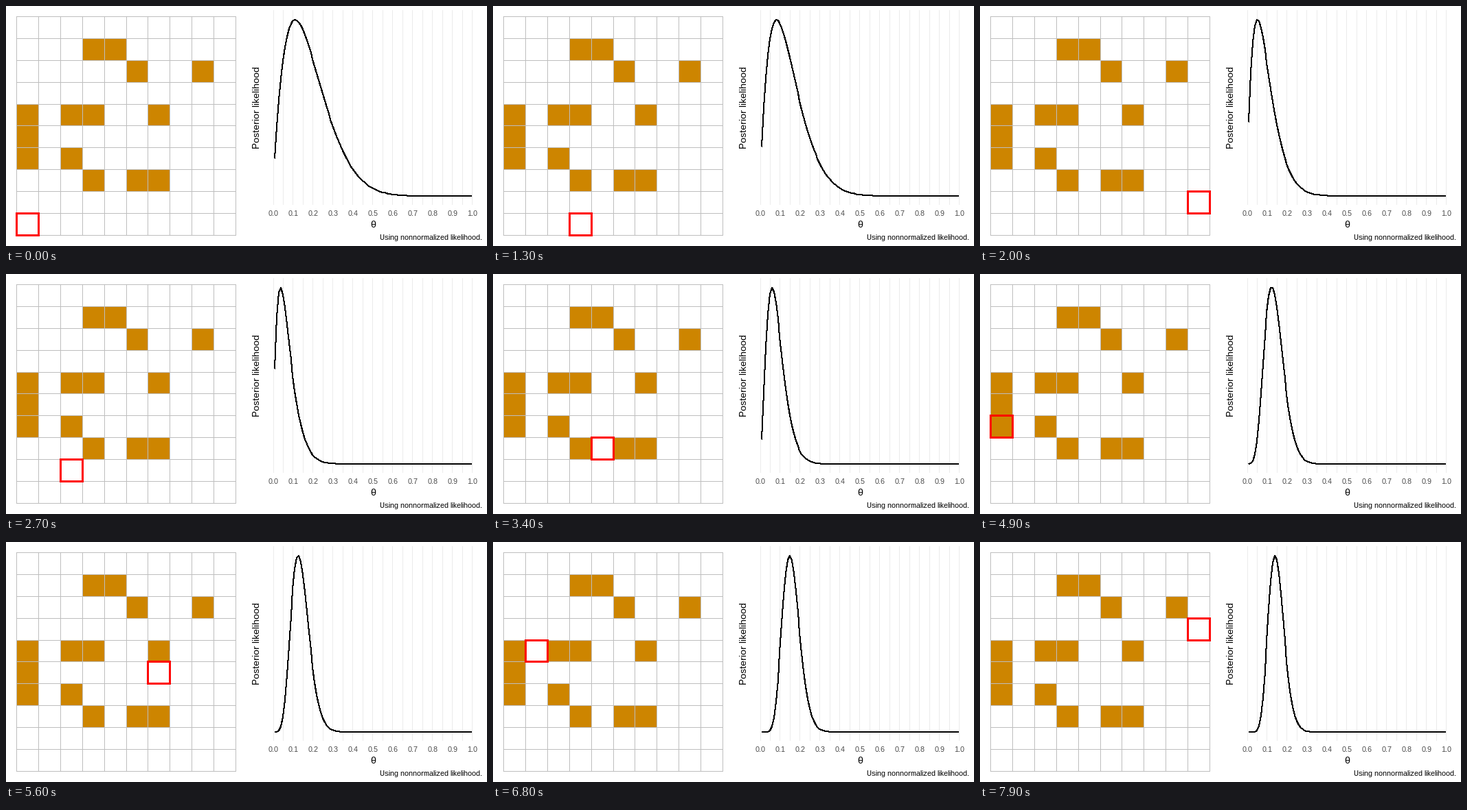
Animation of 700x350 px, one loop 8 s. Source, as a matplotlib script:

```python
import numpy as np
import matplotlib.pyplot as plt
from matplotlib.animation import FuncAnimation
from matplotlib.collections import LineCollection
from matplotlib.patches import Rectangle

W, H, DPI = 700, 350, 100
PX = 72 / DPI
FRAMES, STEP_MS = 80, 100
HOLD = 10                      # extra frames on the first cell

SIDE = 10
XS = np.floor(15.51 + 31.9 * np.arange(SIDE + 1))
YS = np.floor(15.45 + 31.9 * np.arange(SIDE + 1))

# filled columns for each row, counted from the bottom
FILLED = {2: (3, 5, 6), 3: (0, 2), 4: (0,), 5: (0, 2, 3, 6),
          7: (5, 8), 8: (3, 4)}

X0, SPAN = 389.03, 289.5       # theta axis
BASE, TOP = 277, 20            # curve floor and peak
PRIOR_A, PRIOR_B = 2, 8

plt.rcParams.update({
    "font.family": "Liberation Sans",
    "path.simplify": False,
    "text.hinting": "native",  # whole-pixel glyphs and advances
    "text.hinting_factor": 1,
})


def cell(n):
    """Row and column of the n-th cell on the back-and-forth walk."""
    row, k = divmod(n, SIDE)
    return row, k if row % 2 == 0 else SIDE - 1 - k


def corner(row, col):
    """Left, top, width and height of a cell, from line to line."""
    top = SIDE - 1 - row
    return (XS[col], YS[top],
            XS[col + 1] - XS[col], YS[top + 1] - YS[top])


def is_filled(row, col):
    return col in FILLED.get(row, ())


def theta_px(theta):
    return np.floor(X0 + SPAN * theta)


HITS = np.cumsum([is_filled(*cell(n)) for n in range(SIDE * SIDE)])
THETA = np.arange(1, 101) / 100


def curve_y(n):
    """Pixel heights of the posterior after n cells."""
    hits = HITS[n - 1]
    a, b = PRIOR_A - 1 + hits, PRIOR_B - 1 + n - hits
    like = THETA ** a * (1 - THETA) ** b
    return np.round(BASE - (BASE - TOP) * like / like.max())


fig = plt.figure(figsize=(W / DPI, H / DPI), dpi=DPI, facecolor="white")
ax = fig.add_axes([0, 0, 1, 1])
ax.set_xlim(0, W)
ax.set_ylim(H, 0)
ax.axis("off")


def label(x, y, text, px, color="black", **kw):
    ax.text(x, y, text, fontsize=px * PX, color=color,
            **{"ha": "center", "va": "baseline", **kw})


def lines(segments, color, z):
    """One-pixel lines; coordinates are already pixel centres."""
    ax.add_collection(LineCollection(
        segments, colors=color, linewidths=PX, snap=False,
        capstyle="butt", zorder=z))


# cell grid
for row, cols in FILLED.items():
    for col in cols:
        x, y, w, h = corner(row, col)
        ax.add_patch(Rectangle((x, y), w, h, fc="#CD8500", lw=0, zorder=1))
lines([[(x + .5, YS[0]), (x + .5, YS[-1] + 1)] for x in XS], "#BEBEBE", 2)
lines([[(XS[0], y + .5), (XS[-1] + 1, y + .5)] for y in YS], "#BEBEBE", 2)

# posterior panel
ticks = theta_px(np.arange(21) / 20) + .5
lines([[(x, 6), (x, 290)] for x in ticks], "#EBEBEB", 1)
for j in range(11):
    label(X0 + SPAN * j / 10, 306, f"{j / 10:.1f}", 11, "#4D4D4D")
label(534.5, 323, "θ", 14)
label(369, 147.5, "Posterior likelihood", 14, rotation=90,
      rotation_mode="anchor")
label(692.5, 341, "Using nonnormalized likelihood.", 11, ha="right")

# without smoothing every touched pixel is inked, so 1 px covers 2
curve, = ax.plot(theta_px(THETA), curve_y(1), color="black", lw=PX, zorder=3,
                 antialiased=False, snap=False, solid_joinstyle="round",
                 solid_capstyle="butt")
marker = ax.add_patch(Rectangle((0, 0), 1, 1, fill=False, ec="red",
                                lw=3 * PX, zorder=4, joinstyle="miter",
                                snap=False))


def update(i):
    n = max(1, i - HOLD + 1)
    x, y, w, h = corner(*cell(n - 1))
    marker.set_bounds(x + .5, y + .5, w, h)
    curve.set_ydata(curve_y(n))
    return curve, marker


anim = FuncAnimation(fig, update, frames=FRAMES, interval=STEP_MS,
                     repeat=True, repeat_delay=0)
plt.show()
```
